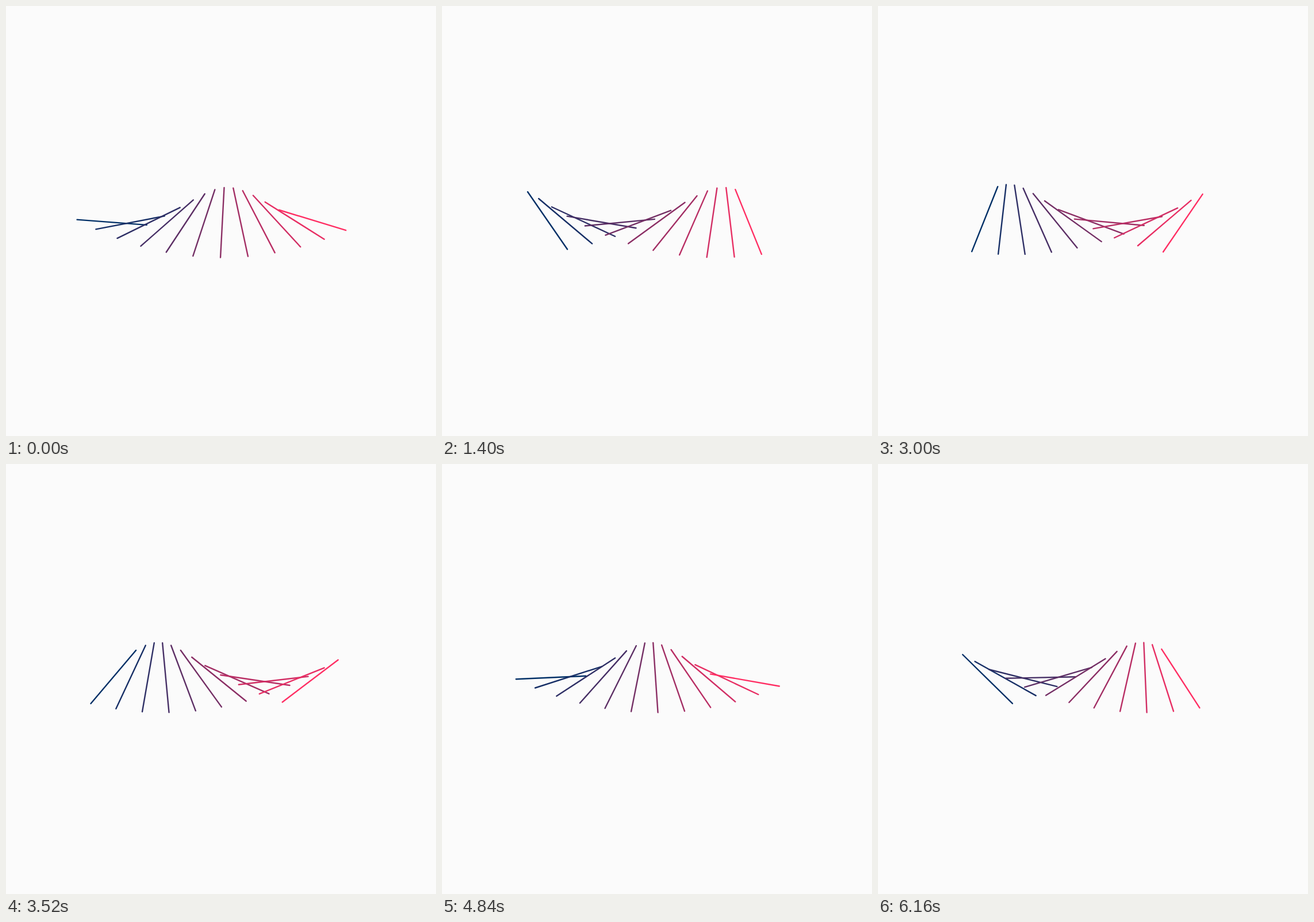
These frames come from a looping animation (748 by 748 pixels, 6.2 s). An HTML page:

```html
<!DOCTYPE html>
<html lang="en">
<head>
<meta charset="utf-8">
<title>Turning lines</title>
<style>
  html, body { margin: 0; width: 100%; height: 100%; overflow: hidden; background: #fbfbfb; }
  svg { display: block; width: 100%; height: 100%; }
  line { stroke-width: 2.4; stroke-linecap: round; }
</style>
</head>
<body>
<svg viewBox="0 0 748 748"></svg>
<script>
const SIZE = 748, COUNT = 12, LOOP = 6200, STEP = 40;
const LAG = 15.22; // degrees each line trails its left neighbour
const FIRST = [0, 47, 102], LAST = [255, 46, 99];
// time in ms, angle of the first line in degrees
const TURN = [
  [0, 4.35], [840, 35.05], [1960, 75.7], [2560, 96.2],
  [3000, 111.75], [4080, 150.25], [4840, 177.4], [6160, 224.5], [6200, 225.9]
];

const mix = (a, b, k) => a + (b - a) * k;
const svg = document.querySelector('svg');

const lines = Array.from({ length: COUNT }, (_, i) => {
  const line = document.createElementNS('http://www.w3.org/2000/svg', 'line');
  const k = i / (COUNT - 1);
  const rgb = FIRST.map((c, n) => Math.round(mix(c, LAST[n], k)));
  // the pivot sits slightly off the middle of the line
  const attrs = { x1: -63.4, x2: 58.2, y1: 2.42, y2: 2.42, stroke: `rgb(${rgb})` };
  for (const name in attrs) line.setAttribute(name, attrs[name]);
  return svg.appendChild(line);
});

function angleAt(t) {
  const n = TURN.findIndex(([time]) => time > t);
  const [t0, a0] = TURN[n - 1], [t1, a1] = TURN[n];
  return mix(a0, a1, (t - t0) / (t1 - t0));
}

function draw(t) {
  const angle = angleAt(t);
  lines.forEach((line, i) => {
    const x = SIZE / 4 + i * SIZE / 24;
    line.setAttribute('transform', `translate(${x} ${SIZE / 2}) rotate(${angle - i * LAG})`);
  });
}

const start = performance.now();
function tick() {
  const t = (performance.now() - start + 1) % LOOP;
  draw(Math.floor(t / STEP) * STEP);
  requestAnimationFrame(tick);
}
tick();
</script>
</body>
</html>
```
